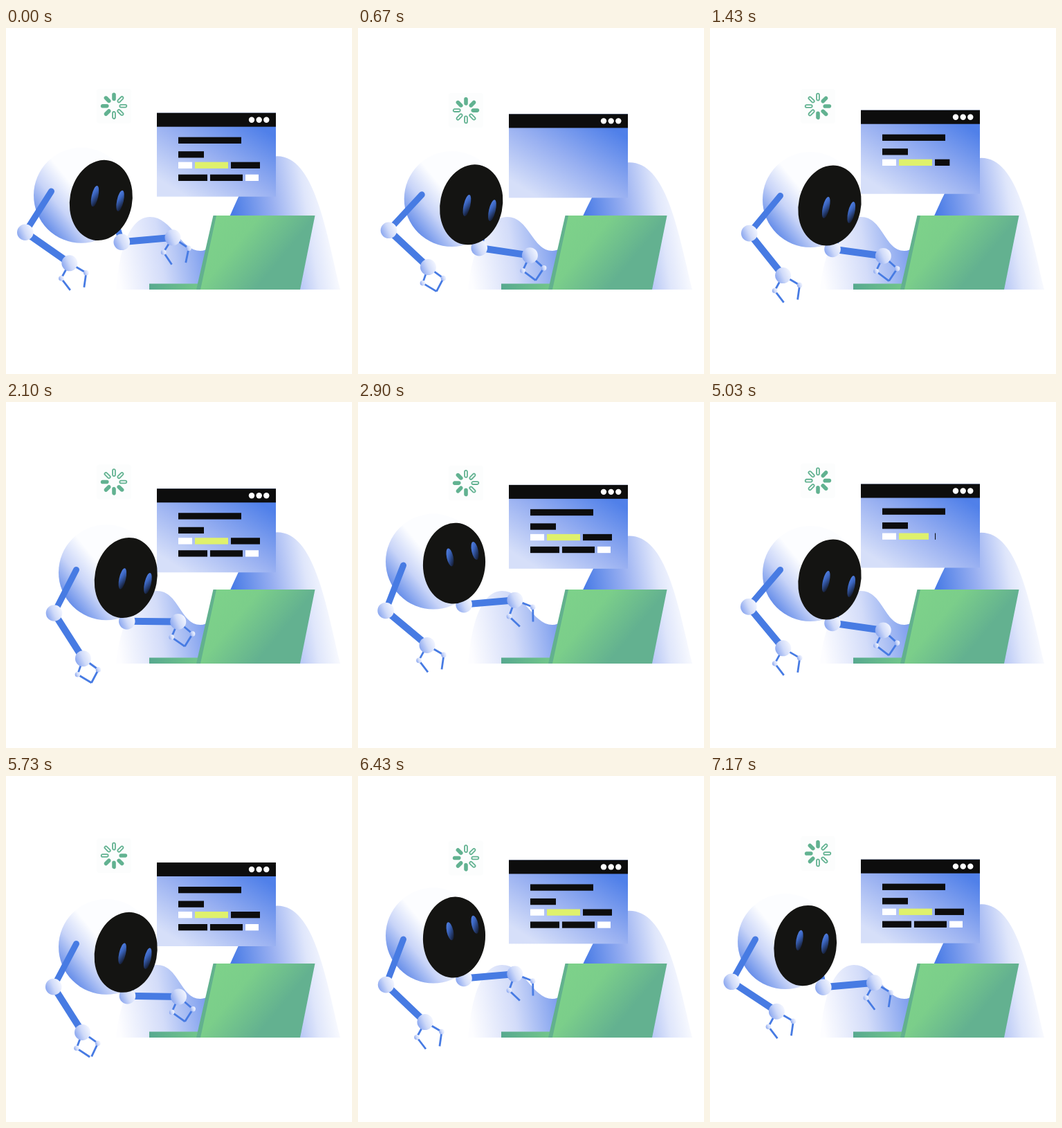
These frames come from a looping animation (500 by 500 pixels, 7.21 s). An HTML page:

```html
<!DOCTYPE html>
<html lang="en">
<head>
<meta charset="utf-8">
<title>Robot at work</title>
<style>
  html, body { margin: 0; width: 100%; height: 100%; overflow: hidden; background: #fff; }
  svg { display: block; width: 100%; height: 100%; }
</style>
</head>
<body>
<svg viewBox="0 0 500 500">
  <defs>
    <linearGradient id="bodyFill" gradientUnits="userSpaceOnUse" x1="160" y1="340" x2="478" y2="290">
      <stop offset="0" stop-color="#fdfdff"/>
      <stop offset=".2" stop-color="#d3dcf9"/>
      <stop offset=".42" stop-color="#7598ed"/>
      <stop offset=".55" stop-color="#4a7ce6"/>
      <stop offset=".73" stop-color="#98aff1"/>
      <stop offset=".88" stop-color="#dfe6fb"/>
      <stop offset="1" stop-color="#fff"/>
    </linearGradient>
    <linearGradient id="headFill" x1=".8" y1=".22" x2=".09" y2=".8">
      <stop offset=".45" stop-color="#fcfdff"/>
      <stop offset=".72" stop-color="#c8d4f8"/>
      <stop offset="1" stop-color="#648ce9"/>
    </linearGradient>
    <linearGradient id="ballFill" x1=".95" y1=".3" x2=".05" y2=".7">
      <stop offset="0" stop-color="#f2f5ff"/>
      <stop offset=".5" stop-color="#cfdaf9"/>
      <stop offset="1" stop-color="#8ca8f0"/>
    </linearGradient>
    <linearGradient id="eyeFill" x1="0" y1="0" x2=".6" y2="1">
      <stop offset="0" stop-color="#5a8af0"/>
      <stop offset=".45" stop-color="#3c66c0"/>
      <stop offset="1" stop-color="#16203a"/>
    </linearGradient>
    <linearGradient id="paneFill" gradientUnits="userSpaceOnUse" x1="350" y1="10" x2="275" y2="130">
      <stop offset="0" stop-color="#5080e9"/>
      <stop offset=".5" stop-color="#97aff1"/>
      <stop offset="1" stop-color="#d6dff9"/>
    </linearGradient>
    <linearGradient id="lidFill" gradientUnits="userSpaceOnUse" x1="300" y1="288" x2="380" y2="354">
      <stop offset="0" stop-color="#7dd18a"/>
      <stop offset=".4" stop-color="#7bce8a"/>
      <stop offset="1" stop-color="#63b190"/>
    </linearGradient>
    <linearGradient id="baseFill" gradientUnits="userSpaceOnUse" x1="207" y1="0" x2="295" y2="0">
      <stop offset="0" stop-color="#57a98f"/>
      <stop offset="1" stop-color="#78cd89"/>
    </linearGradient>
  </defs>

  <path id="body" fill="url(#bodyFill)"/>
  <g id="spinner" stroke="#62b291" stroke-width="1.8">
    <rect x="-25" y="-25" width="50" height="50" rx="4" fill="#fcfdfd" stroke="none"/>
  </g>
  <g id="pane">
    <rect x="218" width="172" height="121" fill="url(#paneFill)"/>
    <rect x="218" width="172" height="20" fill="#0d0d0d"/>
    <g fill="#fff">
      <circle cx="355" cy="10" r="4.2"/><circle cx="365.7" cy="10" r="4.2"/><circle cx="376.3" cy="10" r="4.2"/>
    </g>
    <g id="code"></g>
  </g>
  <g id="rightArm"></g>
  <circle id="head" r="69" fill="url(#headFill)"/>
  <ellipse id="face" rx="45" ry="58.5" fill="#141412"/>
  <g id="eyes" fill="url(#eyeFill)">
    <ellipse cx="-18.6" rx="4.8" ry="15.8" transform="rotate(2 -18.6 0)"/>
    <ellipse cx="18.6" rx="4.8" ry="15.8" transform="rotate(2 18.6 0)"/>
  </g>
  <g id="leftArm"></g>
  <g id="laptop">
    <path d="M207 369.5H290V378H207Z" fill="url(#baseFill)"/>
    <path d="M299.5 271H306L284 378H275Z" fill="#62b18e"/>
    <path d="M304 271H446.5L425 378H281Z" fill="url(#lidFill)"/>
  </g>
</svg>
<script>
const LOOP = 7210, CYCLE = 3670, BOB = CYCLE / 2, SPIN = 897;
const INK = '#0d0d0d', LIME = '#dff16c', GREEN = '#62b291', BLUE = '#477be3';
const $ = id => document.getElementById(id);
const mix = (a, b, k) => a + (b - a) * k;
const set = (el, attrs) => { for (const k in attrs) el.setAttribute(k, attrs[k]); };

function add(parent, tag, attrs) {
  const el = document.createElementNS('http://www.w3.org/2000/svg', tag);
  set(el, attrs);
  return parent.appendChild(el);
}

function ease(t, from, to) {
  const u = Math.min(1, Math.max(0, (t - from) / (to - from)));
  return u * u * (3 - 2 * u);
}
const pulse = (t, up, full, down, end) => ease(t, up, full) - ease(t, down, end);
const wave = (t, mid, amp, peak, period = BOB) =>
  mid + amp * Math.cos((t - peak) / period * 2 * Math.PI);

// A point at a distance from another, angle in degrees clockwise from the right.
function reach([x, y], length, angle) {
  const a = angle * Math.PI / 180;
  return [x + length * Math.cos(a), y + length * Math.sin(a)];
}

// Claw points: knuckle and tip of each of the two fingers.
const OPEN = [[-12, 22], [1, 39], [24, 14], [21, 35]];
const SHUT = [[-8, 23], [12, 35], [22, 16], [12, 35]];

function buildArm(group) {
  const line = (parent, width) => add(parent, 'path', {
    fill: 'none', stroke: BLUE, 'stroke-width': width, 'stroke-linejoin': 'round'
  });
  const ball = (parent, r) => add(parent, 'circle', { r, fill: 'url(#ballFill)' });
  const upper = line(group, 9), lower = line(group, 10);
  set(upper, { 'stroke-linecap': 'round' });
  const hand = add(group, 'g', {});
  const claws = line(hand, 2.8);
  const knuckles = [ball(hand, 3.8), ball(hand, 3.8)];
  const joints = [ball(group, 11.8), ball(group, 11.5)];

  return (shoulder, elbow, wrist, grip, turn) => {
    const [k1, t1, k2, t2] = OPEN.map((pt, i) => pt.map((v, j) => mix(v, SHUT[i][j], grip)));
    const place = (el, [cx, cy]) => set(el, { cx, cy });
    set(upper, { d: `M${shoulder}L${elbow}` });
    set(lower, { d: `M${elbow}L${wrist}` });
    set(hand, { transform: `translate(${wrist}) rotate(${turn})` });
    set(claws, { d: `M0 0L${k1}L${t1}M0 0L${k2}L${t2}` });
    [k1, k2].forEach((pt, i) => place(knuckles[i], pt));
    [elbow, wrist].forEach((pt, i) => place(joints[i], pt));
  };
}
const drawLeftArm = buildArm($('leftArm'));
const drawRightArm = buildArm($('rightArm'));

const petals = Array.from({ length: 8 }, (_, i) => add($('spinner'), 'rect', {
  x: -1.9, y: -18.3, width: 3.8, height: 10, rx: 1.9, transform: `rotate(${i * 45})`
}));

// Lines of code: each bar is a width and a colour, laid out left to right.
const bars = [];
[
  [[91, INK]],
  [[37, INK]],
  [[20, '#fff'], [48, LIME], [42, INK]],
  [[42, INK], [47, INK], [19, '#fff']]
].forEach((row, line) => {
  let x = 249;
  for (const [width, fill] of row) {
    const y = 35 + line * 18 + (line === 1 ? 2.5 : 0);
    bars.push({ width, el: add($('code'), 'rect', { x, y, height: 9.3, fill }) });
    x += width + 4;
  }
});
const CLEAR = 400, TYPE_START = 865, TYPE_STEP = 120, TYPE_TIME = 170;

function typed(i, p) {
  const from = TYPE_START + i * TYPE_STEP;
  return p < CLEAR ? 1 : ease(p, from, from + TYPE_TIME);
}

function drawBody(p, lean) {
  const top = wave(p, 190, 5, 832), dx = lean * 10;
  set($('body'), {
    d: `M160 378C162 330 ${176 + dx} 273 ${208 + dx} 273`
      + `C${240 + dx} 273 252 322 281 322`
      + `C324 322 336 ${top} 392 ${top}C445 ${top} 462 290 483 378Z`
  });
}

function drawSpinner(t, p) {
  set($('spinner'), { transform: `translate(156 ${wave(p, 115.6, 3.6, 735)})` });
  const lead = Math.round(.4 - t / SPIN * 8);
  petals.forEach((el, i) => {
    const behind = (((lead - i) % 8) + 8) % 8;
    set(el, { fill: behind < 4 ? GREEN : '#fff' });
  });
}

function drawPane(p) {
  set($('pane'), { transform: `translate(0 ${wave(p, 122.1, 3.6, 412)})` });
  bars.forEach((bar, i) => set(bar.el, { width: bar.width * typed(i, p) }));
}

// The robot leans in to the laptop, then leans back and glances up.
function drawRobot(p, lean) {
  const glance = pulse(p, 1900, 2780, 2850, 3950) + 1 - ease(p + CYCLE, 2850, 3950);
  const headX = 109 + 36 * lean, headY = 244 + 4 * lean - 13.5 * glance;
  const faceX = headX + 28 + 2 * glance, faceY = 252 + 4.5 * lean - 19 * glance;
  const lookX = 9 + 4 * lean + 3 * glance, lookY = 7 * lean - 13 * glance - .5;
  const lookTilt = 11 - 26 * glance ** 2;
  set($('head'), { cx: headX, cy: headY });
  set($('face'), { transform: `translate(${faceX} ${faceY}) rotate(${12 - 8 * glance})` });
  set($('eyes'), {
    transform: `translate(${faceX + lookX} ${faceY + lookY}) rotate(${lookTilt}) scale(1 ${1 - .16 * glance})`
  });

  const shoulder = [headX - 43.5, 236 + 6.5 * lean];
  const elbow = reach(shoulder, 70.2, 90 + wave(p, 32.3, 11.5, 910, CYCLE));
  const bend = wave(p, 45.2, 11, 1800, CYCLE) + wave(p, 0, 3, 400);
  const wrist = reach(elbow, 78, bend);
  drawLeftArm(shoulder, elbow, wrist, pulse(p % BOB, 110, 260, 680, 900), 0);

  const rightElbow = [170 + 7 * lean - 17 * glance, 312.5 + 7 * lean - 20 * glance];
  const rightWrist = reach(rightElbow, 74, 13.5 * pulse(p, 100, 670, 1200, 2800) - 5);
  drawRightArm([faceX + 20, faceY + 28], rightElbow, rightWrist,
    pulse(p, 110, 300, 2100, 2400), 6 - 15 * glance);
}

function draw(t) {
  const p = t % CYCLE;
  const lean = pulse(p, 150, 930, 2150, 2750);
  drawBody(p, lean);
  drawSpinner(t, p);
  drawPane(p);
  drawRobot(p, lean);
}

const start = performance.now();
function tick() {
  draw((performance.now() - start) % LOOP);
  requestAnimationFrame(tick);
}
draw(0);
requestAnimationFrame(tick);
</script>
</body>
</html>
```
